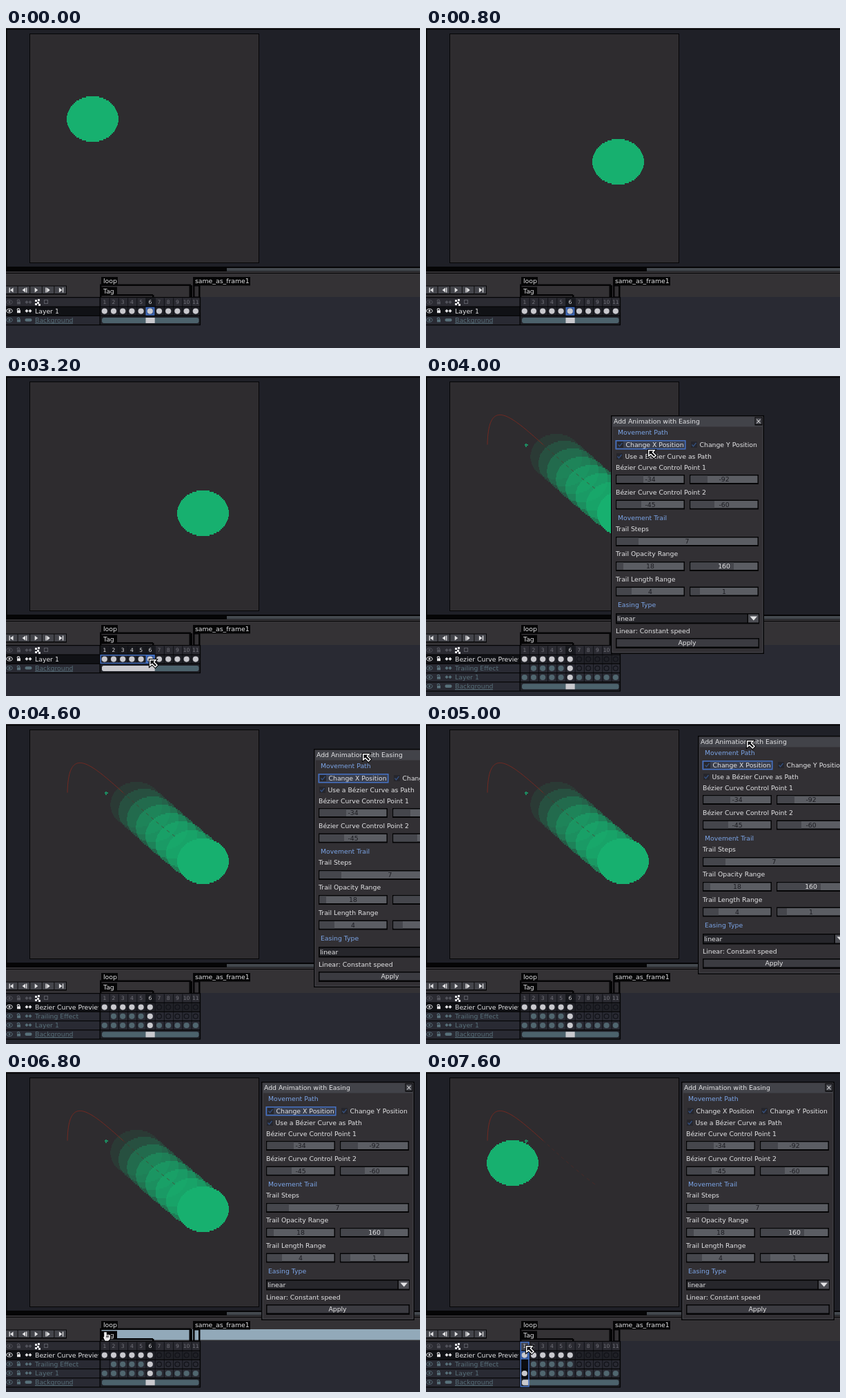
These frames come from a looping animation (600 by 464 pixels, 8000 ms). An HTML page with a canvas:

```html
<!DOCTYPE html>
<html lang="en">
<head>
<meta charset="utf-8">
<title>Easing preview</title>
<style>
html, body { margin: 0; width: 100%; height: 100%; overflow: hidden; background: #1f2027; }
canvas { display: block; width: 600px; height: 464px; }
</style>
</head>
<body>
<canvas id="stage" width="600" height="464"></canvas>
<script>
const g = document.getElementById('stage').getContext('2d');
const LOOP = 8000, STEP = 200, CELL = 13.2, COLS = 11, LEFT = 136.5, TOP = 404;
const GREEN = '#17b06f', BLACK = '#050506', WHITE = '#e4e4e6', DIM = '#58707a',
      LIGHT = '#c9c9ce', FACE = '#323034', BLUE = '#7ba4e6', FOCUS = '#4470c2';

const START = [88, 99], END = [248, 165.5];
const HANDLE1 = [90, -2], HANDLE2 = [153, 97];
const GRIP = [71, 7];

// Keys are [time, x, y].
const ballKeys = [[0, 88, 99], [200, 104, 107], [400, 152, 128], [600, 205, 148],
  [800, 241, 161], [1000, 255, 166], [1200, 248, 165.5]];
const cursorKeys = [[1400, 230, 378], [1600, 163, 402], [1800, 147, 404], [2000, 143, 406],
  [2400, 141, 409], [2600, 176, 411], [2800, 206, 409], [3200, 208, 411], [3400, 225, 370],
  [3800, 305, 150], [4200, 339, 64], [4400, 405, 56], [4600, 517, 43], [4800, 498, 32],
  [5000, 465, 24], [5200, 446, 21], [5400, 441, 21], [6000, 441, 21], [6200, 425, 48],
  [6400, 320, 190], [6600, 190, 345], [6800, 146, 382], [7000, 143, 391], [7200, 145, 397]];

function track(keys, t) {
  if (t <= keys[0][0]) return keys[0].slice(1);
  for (let i = 1; i < keys.length; i++) {
    const [t0, x0, y0] = keys[i - 1], [t1, x1, y1] = keys[i];
    if (t <= t1) {
      const k = (t - t0) / (t1 - t0);
      return [x0 + (x1 - x0) * k, y0 + (y1 - y0) * k];
    }
  }
  return keys[keys.length - 1].slice(1);
}

function box(x, y, w, h, color) {
  g.fillStyle = color;
  g.fillRect(x, y, w, h);
}

function frame(x, y, w, h, color, line = 1) {
  g.strokeStyle = color;
  g.lineWidth = line;
  g.strokeRect(x + line / 2, y + line / 2, w - line, h - line);
}

function text(s, x, middle, color = WHITE, align = 'left', size = 9.3) {
  g.font = size + 'px "DejaVu Sans", sans-serif';
  g.textAlign = align;
  g.fillStyle = color;
  g.fillText(s, x, middle + size * 0.36);
}

function poly(points, color) {
  g.beginPath();
  points.forEach(([x, y]) => g.lineTo(x, y));
  g.closePath();
  g.fillStyle = color;
  g.fill();
}

function dot(x, y, r, color, hollow) {
  g.beginPath();
  g.arc(x, y, r, 0, 7);
  g.lineWidth = 1.2;
  g.fillStyle = g.strokeStyle = color;
  hollow ? g.stroke() : g.fill();
}

// A disc 75 by 66, built from rows two pixels high.
function ball(x, y, alpha = 1) {
  const top = Math.round(y), middle = x + 37.5;
  g.globalAlpha = alpha;
  for (let j = 0; j < 33; j++) {
    const v = (j + 0.5) / 16.5 - 1;
    const half = 37.5 * Math.sqrt(1 - v * v);
    const x0 = Math.round(middle - half), x1 = Math.round(middle + half);
    box(x0, top + j * 2, x1 - x0, 2, GREEN);
  }
  g.globalAlpha = 1;
}

function onCurve(t) {
  const u = 1 - t;
  return [0, 1].map(i => u * u * u * START[i] + 3 * u * u * t * HANDLE1[i] +
    3 * u * t * t * HANDLE2[i] + t * t * t * END[i]);
}

function curve() {
  for (let i = 0; i < 140; i++) {
    const t = i / 140, far = t > 0.68;
    if (far && i % 4 > 1) continue;
    const a = onCurve(t), b = onCurve(t + 1 / 140);
    g.strokeStyle = far ? 'rgba(95,40,34,.55)' : 'rgba(135,42,30,.8)';
    g.lineWidth = 1;
    g.beginPath();
    g.moveTo(a[0] + 1, a[1] + 0.5);
    g.lineTo(b[0] + 1, b[1] + 0.5);
    g.stroke();
  }
  box(143, 99, 5, 2, '#1d8a60');
  box(144, 98, 2, 5, '#1d8a60');
}

function editor(s) {
  box(0, 0, 600, 356, '#1f2027');
  box(0, 0, 600, 1, '#323035');
  box(0, 1, 600, 1.5, BLACK);
  box(0, 1, 1.5, 352, BLACK);
  box(34, 8, 333, 333, BLACK);
  box(35, 9, 331, 331, '#2e2c2f');
  if (s.preview && s.active === 5) {
    for (let k = 7; k > 0; k--) {
      const [x, y] = onCurve(1 - 0.057 * k);
      ball(x, y, (26 + (160 - 26) * (7 - k) / 6) / 255);
    }
  }
  ball(...s.ball);
  if (s.preview) curve();
  box(0, 346, 600, 7, BLACK);
  box(320, 348, 280, 4.5, '#43484e');
}

function player() {
  for (let i = 0; i < 5; i++) {
    const x = i * 17.6, c = x + 8.5;
    box(x, 373.5, 17.6, 13, BLACK);
    box(x, 374.5, 16.6, 10.5, '#44454b');
    const dir = i < 2 ? -1 : 1;
    poly([[c - dir * 2, 376.5], [c + dir * 2.5, 380], [c - dir * 2, 383.5]], WHITE);
    if (i !== 2) box(c + (i === 0 || i === 3 ? -4 : 3), 376.5, 1.3, 7, WHITE);
  }
}

function label(s, x, y, w) {
  box(x, y, w, 12.5, BLACK);
  text(s, x + 3, y + 5.8);
}

function tags(hot) {
  box(0, 353, 600, 37, '#343235');
  box(0, 355, 600, 1, BLACK);
  player();
  if (hot) box(136, 373, 464, 15.5, '#92a9b9');
  box(136, 371.5, 132, 2.5, BLACK);
  box(136, 372, 2.5, 18, BLACK);
  box(265.5, 373, 4.5, 17, BLACK);
  box(137, 386, 76, 2.5, BLACK);
  box(212, 387, 2.5, 3, BLACK);
  frame(271, 372, 10.5, 20, BLACK, 2.5);
  label('loop', 138, 361, 24);
  label('Tag', 138, 375.5, 23);
  label('same_as_frame1', 271, 361, 83);
}

function rowIcons(y, color, pill) {
  g.strokeStyle = color;
  g.lineWidth = 1;
  g.beginPath();
  g.ellipse(5, y, 4.2, 2.8, 0, 0, 7);
  g.stroke();
  dot(5, y, 1.4, color);
  box(16, y - 1, 5, 4, color);
  g.beginPath();
  g.arc(18, y - 1.5, 1.8, Math.PI, 0);
  g.stroke();
  if (pill) {
    g.beginPath();
    g.roundRect(27.5, y - 2.2, 10, 4.4, 2);
    g.fillStyle = color;
    g.fill();
  } else {
    [30, 35].forEach(x => poly([[x - 2.5, y], [x, y - 2.5], [x + 2.5, y], [x, y + 2.5]], color));
  }
}

function cells(name, y, s) {
  for (let i = 0; i < COLS; i++) {
    const x = LEFT + i * CELL, c = x + CELL / 2 - 0.3;
    const top = name === s.rows[0], now = i === s.active;
    const full = name === 'Layer 1' || i < 6 && (top || i > 0);
    box(x, y, CELL, CELL, s.column && now ? '#0c0d10' : top ? '#202127' : '#292a33');
    box(x, y, 1, CELL, '#111217');
    if (top && now && s.selected) {
      box(x, y, CELL, CELL, FOCUS);
      box(x + 2, y + 2, CELL - 4, CELL - 4, '#324f88');
    }
    if (full) dot(c, y + 6.6, 4.1, top || now ? LIGHT : '#50666f');
    else if (i > 5) dot(c, y + 6.6, 3.4, '#121319', true);
  }
}

function background(y, s) {
  box(LEFT, y, COLS * CELL, CELL, '#1f2027');
  g.save();
  g.beginPath();
  g.roundRect(139, y + 2.7, 140.5, 8, 3);
  g.clip();
  box(139, y, 141, CELL, '#4c626c');
  const a = LEFT + s.range[0] * CELL, b = LEFT + (s.range[1] + 1) * CELL;
  box(a, y, b - a, CELL, LIGHT);
  g.restore();
}

function timeline(s) {
  box(0, 390, 600, 74, '#292a33');
  tags(s.hot);
  box(0, 390, 282, 1.5, BLACK);
  box(0, 391.5, 282, 12.5, '#2b2b32');
  rowIcons(397.5, '#52535b');
  [[42, 394], [46, 393], [45, 397], [42, 399], [47, 400]].forEach(([x, y]) => box(x, y, 3, 3, WHITE));
  frame(55, 394, 6, 6, '#5c5d65');
  for (let i = 0; i < COLS; i++) {
    const x = LEFT + i * CELL, on = i >= s.range[0] && i <= s.range[1];
    box(x, 391.5, CELL, 12.5, i === s.hover ? '#454853' : on ? '#17181d' : '#2b2b32');
    box(x, 391.5, 1, 12.5, '#111217');
    text(i + 1, x + 6.3, 397.7, on ? WHITE : '#74747c', 'center', 7.6);
  }
  s.rows.forEach((name, r) => {
    const y = TOP + r * CELL, mid = y + 6.2, last = name === 'Background';
    box(0, y, LEFT, CELL, r ? '#292a33' : '#101115');
    rowIcons(mid, r ? DIM : WHITE, last);
    g.save();
    g.beginPath();
    g.rect(42, y, 92, CELL);
    g.clip();
    text(name, 42, mid, r ? DIM : WHITE);
    g.restore();
    if (last) box(42, y + 10.5, 55, 1, DIM);
    last ? background(y, s) : cells(name, y, s);
    box(0, y - 0.5, 282, 1.2, BLACK);
  });
  const bottom = TOP + s.rows.length * CELL;
  box(0, bottom - 0.5, 282, 1.3, BLACK);
  box(135.5, 390, 1.3, bottom - 390, BLACK);
  box(280.7, 390, 1.4, bottom - 390, BLACK);
  const [a, b] = s.range;
  if (b > a) frame(LEFT, TOP, (b - a + 1) * CELL, CELL, FOCUS, 1.5);
  if (s.column) frame(LEFT, 391, CELL, bottom - 391, FOCUS, 1.5);
}

function slider(x, y, w, fill, value) {
  box(x, y, w, 14, BLACK);
  box(x + 1.5, y + 1.5, w - 3, 10.5, '#5b5d63');
  box(x + 1.5, y + 1.5, fill - 1.5, 10.5, '#45464c');
  text(value, x + w / 2, y + 7, fill > w / 2 ? WHITE : '#1c1c21', 'center');
}

function check(x, y, s) {
  box(x - 4, y - 5, 9, 9, '#26262c');
  g.strokeStyle = '#34507f';
  g.lineWidth = 1.3;
  g.beginPath();
  g.moveTo(x - 2.5, y - 0.5);
  g.lineTo(x - 0.5, y + 2);
  g.lineTo(x + 3.5, y - 3);
  g.stroke();
  text(s, x + 8.5, y - 0.5);
}

function dialog(x, y, focused) {
  g.save();
  g.translate(x, y);
  box(0, 0, 222, 346, BLACK);
  box(1.5, 1.5, 219, 343, '#4a4a50');
  box(2.5, 2.5, 217, 341, FACE);
  box(2.5, 2.5, 217, 14, '#424349');
  text('Add Animation with Easing', 4, 9);
  box(208.5, 2.5, 11, 12, BLACK);
  box(209.5, 3.5, 9, 9.5, '#424349');
  text('×', 214, 8.2, WHITE, 'center', 10);

  [['Movement Path', 24.5], ['Movement Trail', 149], ['Easing Type', 275]]
    .forEach(([s, ty]) => text(s, 10, ty, BLUE));
  [['Bézier Curve Control Point 1', 75.5], ['Bézier Curve Control Point 2', 112],
    ['Trail Steps', 165], ['Trail Opacity Range', 201], ['Trail Length Range', 237.5],
    ['Linear: Constant speed', 312.5]].forEach(([s, ty]) => text(s, 7, ty));

  if (focused) {
    box(6.5, 36, 102, 13.5, '#3a3f4e');
    frame(6.5, 36, 102, 13.5, FOCUS, 1.5);
  }
  check(13, 43, 'Change X Position');
  check(120, 43, 'Change Y Position');
  check(12, 60, 'Use a Bézier Curve as Path');

  [[86, 40, '-34', 26, '-92'], [122.5, 37, '-45', 36, '-60'],
    [212, 11, '18', 64, '160'], [248.5, 23, '4', 15, '1']].forEach(([sy, f1, v1, f2, v2]) => {
    slider(7, sy, 100, f1, v1);
    slider(114, sy, 100, f2, v2);
  });
  slider(7, 176, 207, 33, '7');

  box(7, 287, 208, 15.5, BLACK);
  box(8.5, 288.5, 189, 12, '#26262b');
  text('linear', 9, 294.7);
  box(199, 288.5, 15, 12, '#4c4d53');
  poly([[201.5, 291.5], [212, 291.5], [206.8, 297.5]], WHITE);

  box(7, 323, 208, 15, BLACK);
  box(8.5, 324.5, 205, 11, '#3b3b41');
  text('Apply', 110.5, 329.7, WHITE, 'center');
  g.restore();
}

function outline(points, fill) {
  g.beginPath();
  points.forEach(([x, y]) => g.lineTo(x, y));
  g.closePath();
  g.lineJoin = 'miter';
  g.strokeStyle = BLACK;
  g.lineWidth = 3.6;
  g.stroke();
  g.fillStyle = fill;
  g.fill();
  g.strokeStyle = '#fff';
  g.lineWidth = 1.5;
  g.stroke();
}

function pointer([x, y], hand) {
  g.save();
  g.translate(x, y);
  if (hand) {
    outline([[-3, -4], [-1, -4], [-1, 0], [4, 0], [4, 5], [2, 7], [-2, 7], [-4, 3], [-3, 2]], WHITE);
    g.lineWidth = 1;
    g.strokeStyle = BLACK;
    [0, 2].forEach(fx => { g.beginPath(); g.moveTo(fx, 0); g.lineTo(fx, 3); g.stroke(); });
  } else {
    outline([[0.7, 0.7], [9, 0.7], [6.5, 3.8], [11, 8.3], [8.3, 11], [3.8, 6.5], [0.7, 9]], '#0c0c0f');
  }
  g.restore();
}

function stateAt(t) {
  const cursor = track(cursorKeys, t);
  const preview = t >= 3400, column = t >= 7600;
  const first = t >= 2000 && t < 2800 || column;
  let range = first ? [0, 0] : [5, 5];
  if (t >= 2600 && t < 3400) range = [0, t < 2800 ? 3 : 5];
  const active = t >= 2600 && t < 2800 ? 3 : first ? 0 : 5;
  return {
    cursor, preview, column, range, active,
    selected: !preview || column,
    ball: first ? START : track(ballKeys, t),
    rows: (preview ? ['Bezier Curve Preview', 'Trailing Effect'] : []).concat('Layer 1', 'Background'),
    hot: t === 1400 || t === 6800,
    hover: t === 1600 ? 1 : t === 1800 || t >= 7000 ? 0 : -1,
    panel: t < 4400 ? [268, 57] : t < 5400 ? cursor.map((v, i) => v - GRIP[i]) : [370, 14],
    focused: !column
  };
}

function draw(now) {
  const t = Math.floor(now % LOOP / STEP) * STEP;
  const s = stateAt(t);
  editor(s);
  timeline(s);
  if (s.preview) dialog(...s.panel, s.focused);
  if (t >= 1400) pointer(s.cursor, s.hot);
}

const began = performance.now();
function tick() {
  draw(performance.now() - began);
  requestAnimationFrame(tick);
}
tick();
</script>
</body>
</html>
```
